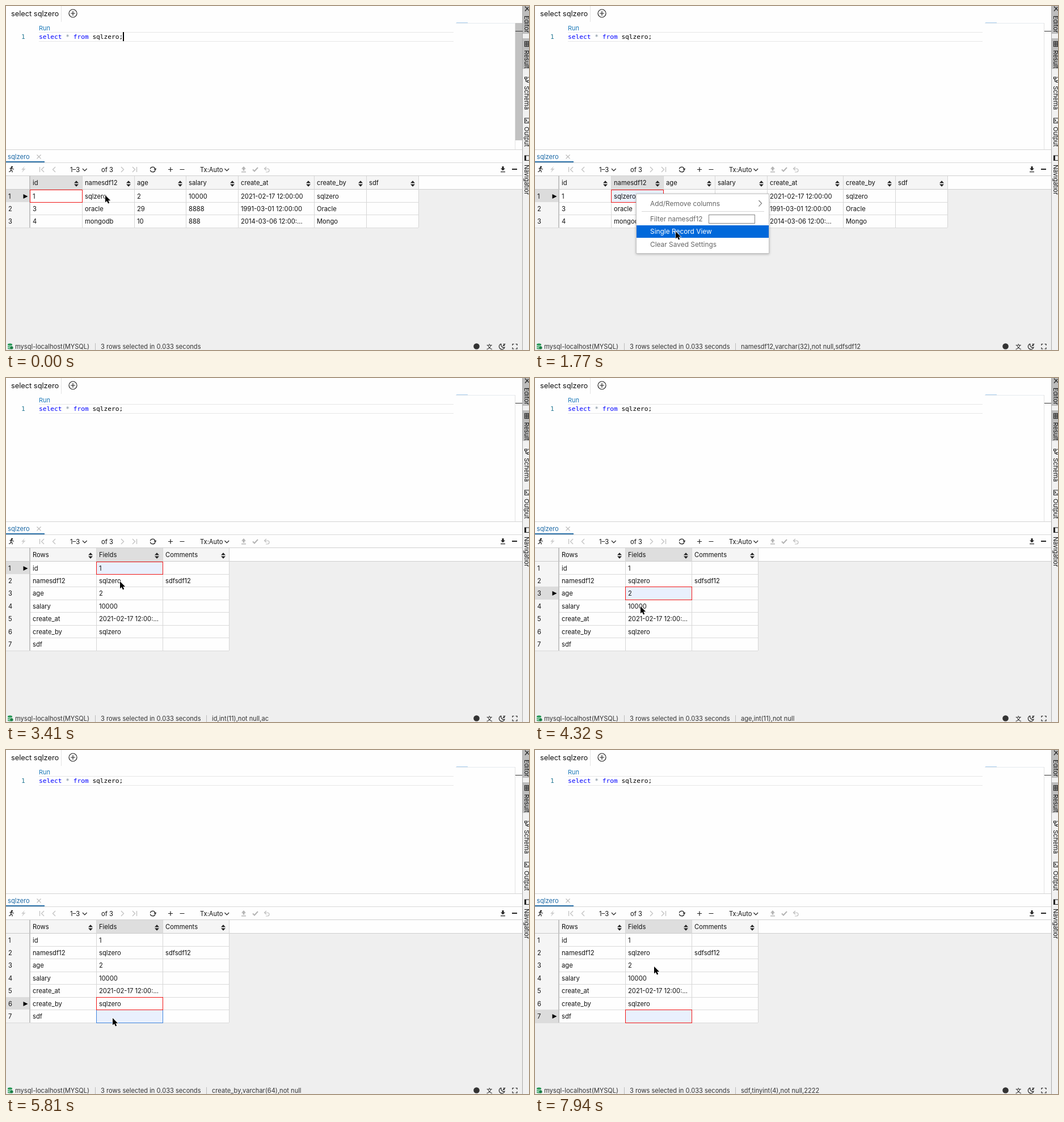
An HTML page for the animation above (8 s loop, 922x607 px).

```html
<!DOCTYPE html>
<html lang="en">
<head>
<meta charset="utf-8">
<title>Single record view</title>
<style>
  html, body { margin: 0; width: 100%; height: 100%; overflow: hidden; background: #efefef; }
  svg { display: block; width: 922px; height: 607px; font: 11.2px Inter, "Open Sans", sans-serif; fill: #111; }
  text { white-space: pre; }
  rect { shape-rendering: crispEdges; }
  .line { fill: none; stroke: #222; stroke-width: 1.2; }
  .pale { stroke: #bdbdbd; }
  .gray { stroke: #777; }
  .light { stroke: #dff2e6; }
  .code { font: 11.2px "DejaVu Sans Mono", monospace; }
  .status { font-size: 11.1px; fill: #333; }
  .item { font-size: 11.9px; }
</style>
</head>
<body>
<svg id="stage" viewBox="0 0 922 607">
  <g id="chrome"></g>
  <g id="live"></g>
  <path id="cursor" d="M0 0V12.6L2.9 10 5 14.6 7.2 13.6 5.2 9.2H9.2Z" fill="#000" stroke="#fff" stroke-width="1.2" paint-order="stroke"/>
</svg>
<script>
const LOOP = 8000;
const $ = id => document.getElementById(id);
const text = (x, y, s, attrs = '') => `<text x="${x}" y="${y}" ${attrs}>${s}</text>`;
const rect = (x, y, w, h, fill, attrs = '') =>
  `<rect x="${x}" y="${y}" width="${w}" height="${h}" fill="${fill}" ${attrs}/>`;
const line = (d, cls = '') => `<path class="line ${cls}" d="${d}"/>`;
const solid = (d, fill = '#222') => `<path d="${d}" fill="${fill}"/>`;

// ---------- fixed window parts ----------
function editor() {
  return rect(0, 0, 911, 323, '#fefefe') +
    text(9, 17.5, 'select sqlzero', 'font-size="12.8"') +
    rect(97, 0, 1, 28, '#e4e4e4') +
    `<circle class="line" cx="118" cy="13" r="7"/>` + line('M114 13h8M118 9v8') +
    text(58, 42.5, 'Run', 'font-size="11" fill="#1a78b8"') +
    rect(58, 46, 731, 1, '#e6e6e6') + rect(58, 62, 731, 1, '#e6e6e6') +
    text(27, 58, '1', 'class="code" fill="#237893"') +
    text(58, 58, '<tspan fill="#00f">select</tspan> <tspan fill="#789">*</tspan> ' +
      '<tspan fill="#00f">from</tspan> <tspan fill="#000">sqlzero;</tspan>', 'class="code"') +
    rect(793, 30, 104, 1, '#e6eaee') + rect(794, 29, 20, 1, '#a9cdec') +
    rect(897, 30, 1, 223, '#e2e2e2') + rect(898, 44, 13, 1, '#333');
}

function toolbar() {
  return rect(0, 253, 911, 1, '#d4d4d4') +
    text(3, 269.5, 'sqlzero', 'fill="#1b69a6"') +
    line('M54.5 262.5l7 7m0-7l-7 7', 'pale') +
    rect(0, 276, 911, 1, '#d8d8d8') + rect(0, 274, 68, 2, '#2a70a8') +
    '<circle cx="10.5" cy="284" r="1.4"/>' +
    line('M6.5 287l3-1.5 2 2 2.5.5M9.5 286l-1 3 2.5 2v2.5M8.5 289.5l-1 2.5-2.5.3') +
    solid('M33 282.5l-6 6.5h3l-2 5 6.5-7h-3.5z', '#d0d0d0') +
    line('M59.5 284v9M67 284l-4.5 4.5 4.5 4.5M87 284l-4.5 4.5 4.5 4.5M203 284l4.5 4.5-4.5 4.5M223 284l4.5 4.5-4.5 4.5M230.5 284v9', 'pale') +
    text(113, 292.5, '1–3') + line('M135 287l3.8 3.8 3.8-3.8') +
    text(168, 292.5, 'of 3') +
    line('M254.4 287.5a4.4 4.4 0 0 1 8.6 0M263 289.5a4.4 4.4 0 0 1-8.6 0') +
    solid('M260.5 287h5l-2.5 3z') +
    line('M286 288.5h8M290 284.5v8M306.5 288.5h8') +
    text(342, 292.5, 'Tx:Auto') + line('M385.5 287l3.8 3.8 3.8-3.8') +
    solid('M419 283l4 4.5h-2.5v3h-3v-3H415zM415 292h8v1.5h-8z', '#b4b4b4') +
    '<path d="M435 288.5l3 3 6-6.5" fill="none" stroke="#b4b4b4" stroke-width="2"/>' +
    line('M459 284l-3.5 3 3.5 3M456 287h5a3 3 0 0 1 0 6h-3', 'pale') +
    solid('M874.5 283h3v3.5h2.5l-4 4-4-4h2.5zM872 292h8v1.3h-8z') +
    rect(892, 287, 9, 2, '#222') +
    rect(0, 299, 911, 1, '#cfcfcf') + rect(0, 323, 911, 1, '#cfcfcf');
}

function sidebar() {
  const label = (y, s) => `<text transform="translate(914 ${y}) rotate(90)" font-size="11">${s}</text>`;
  return rect(911, 0, 11, 607, '#f1f1f1') +
    rect(911, 0, 11, 49, '#bdbdbd') + rect(911, 57, 11, 54, '#bdbdbd') +
    rect(910, 0, 1, 607, '#aaa') +
    label(17, 'Editor') + label(78, 'Result') + label(141, 'Schema') + label(213, 'Output') + label(280, 'Navigation') +
    rect(911, 333, 11, 8, '#f1f1f1') +
    line('M915 1l7 7M921 2l-6 7') +
    line('M914.5 62.5h8v9h-8zM914.5 65.5h8M914.5 68.5h8M917.5 62.5v9M920.5 62.5v9') +
    line('M914.5 125.5h4v3h-4zM919 131.5h4v3h-4zM916.5 129v4h2.5M920 126h2') +
    line('M914.5 198h8v8.5h-8zM916 200l2 2-2 2M919 204.5h3') +
    line('M914.5 264h8v8.5h-8z') + rect(914, 264, 3, 9, '#222');
}

function statusBar() {
  return solid('M3 597c0-2 8-2 8 0v7c0 2-8 2-8 0z', '#2c9a5b') +
    line('M3 599c2 1.5 6 1.5 8 0M3 602c2 1.5 6 1.5 8 0', 'light') +
    '<circle cx="10" cy="603" r="2.6" fill="#1c7d45"/>' +
    text(16, 604.5, 'mysql-localhost(MYSQL)', 'class="status"') +
    rect(157, 595, 1, 12, '#bbb') +
    text(167, 604.5, '3 rows selected in 0.033 seconds', 'class="status"') +
    '<circle cx="829.5" cy="600.5" r="5.3" fill="#333"/>' +
    text(847, 604.5, '文', 'font-family="Noto Sans CJK SC, sans-serif" font-size="10.5"') +
    line('M873 596a5 5 0 1 0 6 6.5a5 5 0 0 1-6-6.5M876.5 596.5h3l-3 3h3') +
    line('M893 599v-2.5h2.5M898.5 596.5h2.5v2.5M901 602.5v2.5h-2.5M895.5 605h-2.5v-2.5') +
    line('M914.5 596.5h8v8h-8z');
}

$('chrome').innerHTML = editor() + toolbar() + statusBar() + sidebar();

// ---------- grids ----------
const TABLE = {
  edges: [42, 134, 226, 317, 409, 543, 635, 727],
  heads: ['id', 'namesdf12', 'age', 'salary', 'create_at', 'create_by', 'sdf'],
  rows: [
    ['1', 'sqlzero', '2', '10000', '2021-02-17 12:00:00', 'sqlzero', ''],
    ['3', 'oracle', '29', '8888', '1991-03-01 12:00:00', 'Oracle', ''],
    ['4', 'mongodb', '10', '888', '2014-03-06 12:00:...', 'Mongo', '']
  ]
};
const RECORD = {
  edges: [42, 159, 276, 393],
  heads: ['Rows', 'Fields', 'Comments'],
  rows: TABLE.heads.map((name, i) => [
    name, i === 4 ? '2021-02-17 12:00:...' : TABLE.rows[0][i], i === 1 ? 'sdfsdf12' : ''
  ])
};
const rowTop = r => Math.floor(324 + r * 22.45);

function grid({ edges, heads, rows }, { focus, press, active }) {
  const right = edges[heads.length], bottom = rowTop(rows.length);
  let out = rect(0, 300, 42, 23, '#f5f5f5') + rect(0, 324, right, bottom - 324, '#fefefe');
  heads.forEach((name, c) => {
    const x = edges[c], end = edges[c + 1];
    out += rect(x, 300, end - x, 23, c === focus[1] ? '#dedede' : '#f5f5f5') +
      text(x + 5, 316, name) +
      solid(`M${end - 14} 312.5h8l-4-4.2zM${end - 14} 314.5h8l-4 4.2z`);
  });
  out += rect(0, 323, right, 1, '#c9c9c9');
  rows.forEach((cells, r) => {
    const y = rowTop(r), next = rowTop(r + 1);
    out += rect(0, y, 42, next - y, r === focus[0] ? '#dcdcdc' : '#f5f5f5') +
      rect(0, next, right, 1, '#dadada') + text(4, y + 16, r + 1);
    if (r === focus[0]) out += solid(`M30.5 ${y + 8}l8 4-8 4z`, '#000');
  });
  edges.forEach((x, i) => out += rect(x - !i, 300, i ? 1 : 2, bottom - 300, i ? '#d6d6d6' : '#c4c4c4'));

  const frame = ([r, c], fill, stroke) => rect(edges[c] + .5, rowTop(r) + .5,
    edges[c + 1] - edges[c], rowTop(r + 1) - rowTop(r), fill, `stroke="${stroke}"`);
  if (press) out += frame(press, '#e9f0fd', '#3f83dc');
  out += frame(focus, active && !press ? '#e9f0fd' : '#fefefe', '#f01414');
  rows.forEach((cells, r) => cells.forEach((s, c) => out += text(edges[c] + 5, rowTop(r) + 16, s)));
  return out;
}

function menu(x, y) {
  const item = (top, height, label) => {
    const on = x >= 178 && x <= 412 && y >= top && y < top + height;
    return (on ? rect(179, top, 233, height, '#0068da') : '') +
      text(203, top + height / 2 + 4, label, `class="item" fill="${on ? '#fff' : '#666'}"`);
  };
  return rect(178.5, 331.5, 234, 105, '#fff', 'stroke="#c4c4c4" style="filter:drop-shadow(0 1px 2px #0004)"') +
    item(337, 23, 'Add/Remove columns') + line('M394.5 343l5 5.3-5 5.3', 'gray') +
    rect(188, 362, 216, 1, '#d6d6d6') +
    text(203, 380, 'Filter namesdf12', 'class="item" fill="#666"') +
    rect(306.5, 368.5, 81, 15, '#fff', 'stroke="#858585"') +
    item(387, 22, 'Single Record View') + item(409, 23, 'Clear Saved Settings');
}

// ---------- timeline ----------
const FIELD_INFO = ['id,int(11),not null,ac', 'namesdf12,varchar(32),not null,sdfsdf12', 'age,int(11),not null',
  'salary,decimal(10,0),not null', 'create_at,datetime,not null', 'create_by,varchar(64),not null',
  'sdf,tinyint(4),not null,2222'];

// A click marks the cell first; the focus follows a moment later.
const click = (down, up, row, field = row) => [
  [down, { press: [row, 1] }],
  [up, { press: null, focus: [row, 1], active: true, status: FIELD_INFO[field] }]
];
const EVENTS = [
  [0, { view: TABLE, focus: [0, 0], press: null, active: false, status: '', menu: false, caret: true, scrollbar: 1 }],
  [200, { caret: false, scrollbar: .5 }],
  ...click(200, 290, 0, 1),
  [290, { scrollbar: 0 }],
  [670, { menu: true }],
  [1860, { menu: false, view: RECORD, focus: [0, 0] }],
  ...click(3170, 3260, 0),
  ...click(3590, 3680, 1),
  ...click(4060, 4150, 2),
  ...click(4410, 4500, 3),
  ...click(4880, 4970, 4),
  ...click(5330, 5430, 5),
  ...click(5810, 5890, 6)
];

// start, end, steps, destination, optional control point
const HOME = [175, 334];
const MOVES = [
  [880, 1440, 7, [248, 398], [600, 530]],
  [2160, 2640, 6, [168, 335]],
  [3330, 3410, 2, [201, 359]],
  [3790, 3790, 1, [195, 364]],
  [3970, 4060, 2, [190, 380]],
  [4240, 4320, 2, [186, 403]],
  [4580, 4670, 2, [183, 420]],
  [4790, 4880, 2, [185, 423]],
  [5060, 5150, 2, [186, 446]],
  [5530, 5630, 2, [188, 473]],
  [5980, 6160, 3, [196, 471]],
  [6310, 6580, 4, [211, 466]],
  [6820, 7110, 4, [167, 458], [192, 428]],
  [7410, 7940, 7, [210, 382], [333, 420]]
];

function pointer(t) {
  let from = HOME;
  for (const [start, end, steps, to, via] of MOVES) {
    if (t < start) break;
    if (t < end) {
      const p = (Math.floor((t - start) / (end - start) * (steps - 1)) + 1) / steps;
      return from.map((a, i) => {
        const mid = via ? via[i] : (a + to[i]) / 2;
        return (1 - p) ** 2 * a + 2 * p * (1 - p) * mid + p * p * to[i];
      });
    }
    from = to;
  }
  return from;
}

function scene(t) {
  const state = Object.assign({}, ...EVENTS.filter(([at]) => at <= t).map(([, change]) => change));
  const [x, y] = pointer(t);
  let out = grid(state.view, state);
  if (state.caret) out += rect(206, 46, 2, 16, '#000');
  if (state.scrollbar) out += rect(898, 30, 12, 207, '#c1c1c1', `opacity="${state.scrollbar}"`) + rect(898, 44, 13, 1, '#333');
  if (state.status) out += rect(353, 595, 1, 12, '#bbb') + text(363, 604.5, state.status, 'class="status"');
  if (state.menu) out += menu(x, y);
  return { out, x, y };
}

let shown = '';
function tick() {
  const { out, x, y } = scene(performance.now() % LOOP);
  if (out !== shown) $('live').innerHTML = shown = out;
  $('cursor').setAttribute('transform', `translate(${x} ${y})`);
  requestAnimationFrame(tick);
}
tick();
</script>
</body>
</html>
```
